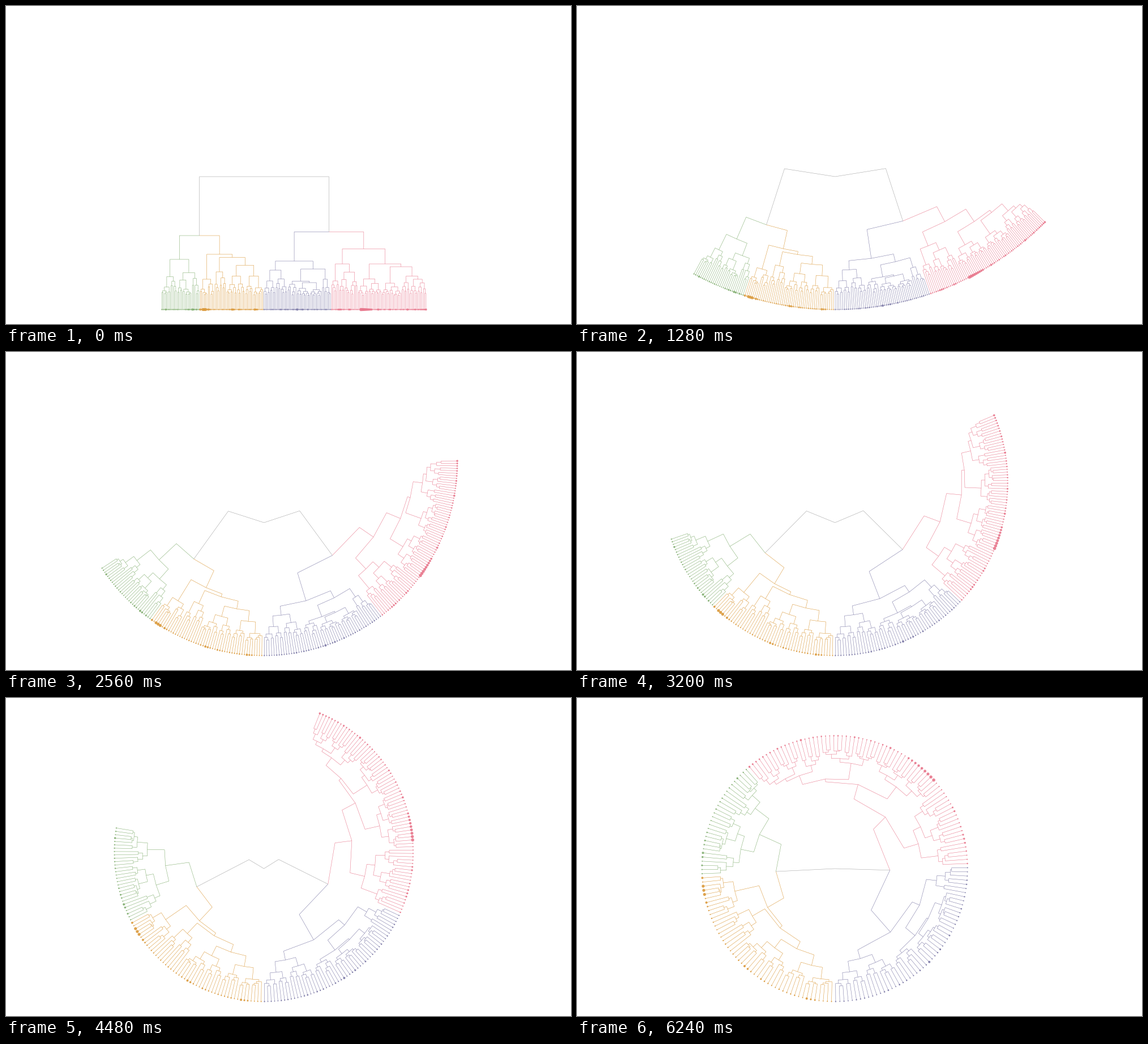
Recreate the animation shown at these times as a matplotlib script. Size 998 by 561 pixels, loop 6560 ms.

```python
import math
import random

import matplotlib.pyplot as plt
import numpy as np
from matplotlib.animation import FuncAnimation
from matplotlib.collections import LineCollection

W, H, DPI = 998, 561, 100
TICKS, STEP = 41, 160
PX = 72 / DPI

CX, TOP, BASE = 455.3, 301.0, 535.5
DEPTH = BASE - TOP
LEAVES = 200
SPREAD = DEPTH / math.pi     # flat width equals the circle's width
PITCH = 2 * DEPTH / LEAVES
MID = 76.78                  # leaf position straight below the root
FLOOR = 514                  # lowest height at which branches meet

GREY, GREEN, ORANGE = "#a3a3a3", "#82ae70", "#db9a3c"
PURPLE, PINK = "#7c79a6", "#e8778c"

# Main branches only: (y, left, right), or (y, n) for a clump of n leaves.
green = (447, (477.5, 12), (470.5, 17))
orange = (438, (482, 11),
          (443.5, (469, 9),
           (457.5, (476.5, 14), (476.5, 14))))
purple = (450,
          (466, (485, 9), (481.5, 9)),
          (464, (485.5, (491, 7), (488, 19)), (482, 7)))
pink = (428.5,
        (455, (485, 6), (469.5, 14)),
        (455, (481.5, 18),
         (460, (489, 15),
          (476.5, (488, 6), (482, 13)))))

rng = random.Random(11)
links, link_colors, leaf_colors = [], [], []


def join(y, a, b):
    """Link two nodes (x, y, colour) under a new parent."""
    x = (a[0] + b[0]) / 2
    for cx, cy, color in (a, b):
        links.append((x, y, cx, cy))
        link_colors.append(color)
    return x, y, a[2] if a[2] == b[2] else GREY


def clump(y, n, color):
    """Split n leaves at random, each level a step closer to the floor."""
    if n == 1:
        leaf_colors.append(color)
        return len(leaf_colors) - 1, BASE, color
    least = max(1, n * 2 // 5)
    left = rng.randint(least, n - least)
    a, b = (clump(y + (FLOOR - y) * rng.uniform(0.2, 0.55), k, color)
            for k in (left, n - left))
    return join(y, a, b)


def grow(spec, color):
    if len(spec) == 2:
        return clump(*spec, color)
    y, left, right = spec
    a = grow(left, color)
    b = grow(right, color)
    return join(y, a, b)


west = join(405, grow(green, GREEN), grow(orange, ORANGE))
east = join(398.5, grow(purple, PURPLE), grow(pink, PINK))
join(TOP, west, east)

px, py, qx, qy = np.array(links).T
elbow_x = np.stack([px, qx, qx], axis=1)
elbow_y = np.stack([py, py, qy], axis=1)
leaf_x = np.arange(LEAVES)
leaf_y = np.full(LEAVES, BASE)

# Mostly small dots, with one run of large ones in orange and one in pink.
radii = np.array([0.9 + min(rng.expovariate(3.5), 1.1) for _ in leaf_x])
radii[31:34] = 2.6
radii[150:159] = np.linspace(2.8, 1.8, 9)


def bend(x, y, t):
    """Roll the flat tree up; t = 0 is straight, t = 1 a full circle."""
    u = (x - MID) * PITCH
    if t == 0:
        return np.stack([CX + u, y], axis=-1)
    radius = DEPTH - SPREAD + SPREAD / t
    rho = radius - (BASE - y)
    angle = t * u / SPREAD
    return np.stack([CX + rho * np.sin(angle),
                     BASE - radius + rho * np.cos(angle)], axis=-1)


fig = plt.figure(figsize=(W / DPI, H / DPI), dpi=DPI, facecolor="white")
ax = fig.add_axes([0, 0, 1, 1])
ax.set_xlim(0, W)
ax.set_ylim(H, 0)
ax.axis("off")

branches = LineCollection([], colors=link_colors, linewidths=0.55 * PX,
                          joinstyle="miter", snap=False)
ax.add_collection(branches)
start = bend(leaf_x, leaf_y, 0)
dots = ax.scatter(start[:, 0], start[:, 1], s=(2 * radii * PX) ** 2,
                  c=leaf_colors, alpha=0.9, linewidths=0, zorder=3)


def update(tick):
    t = min(tick / (TICKS - 2), 1)
    branches.set_segments(bend(elbow_x, elbow_y, t))
    dots.set_offsets(bend(leaf_x, leaf_y, t))
    return branches, dots


anim = FuncAnimation(fig, update, frames=TICKS, interval=STEP,
                     repeat=True, repeat_delay=0)
plt.show()
```
